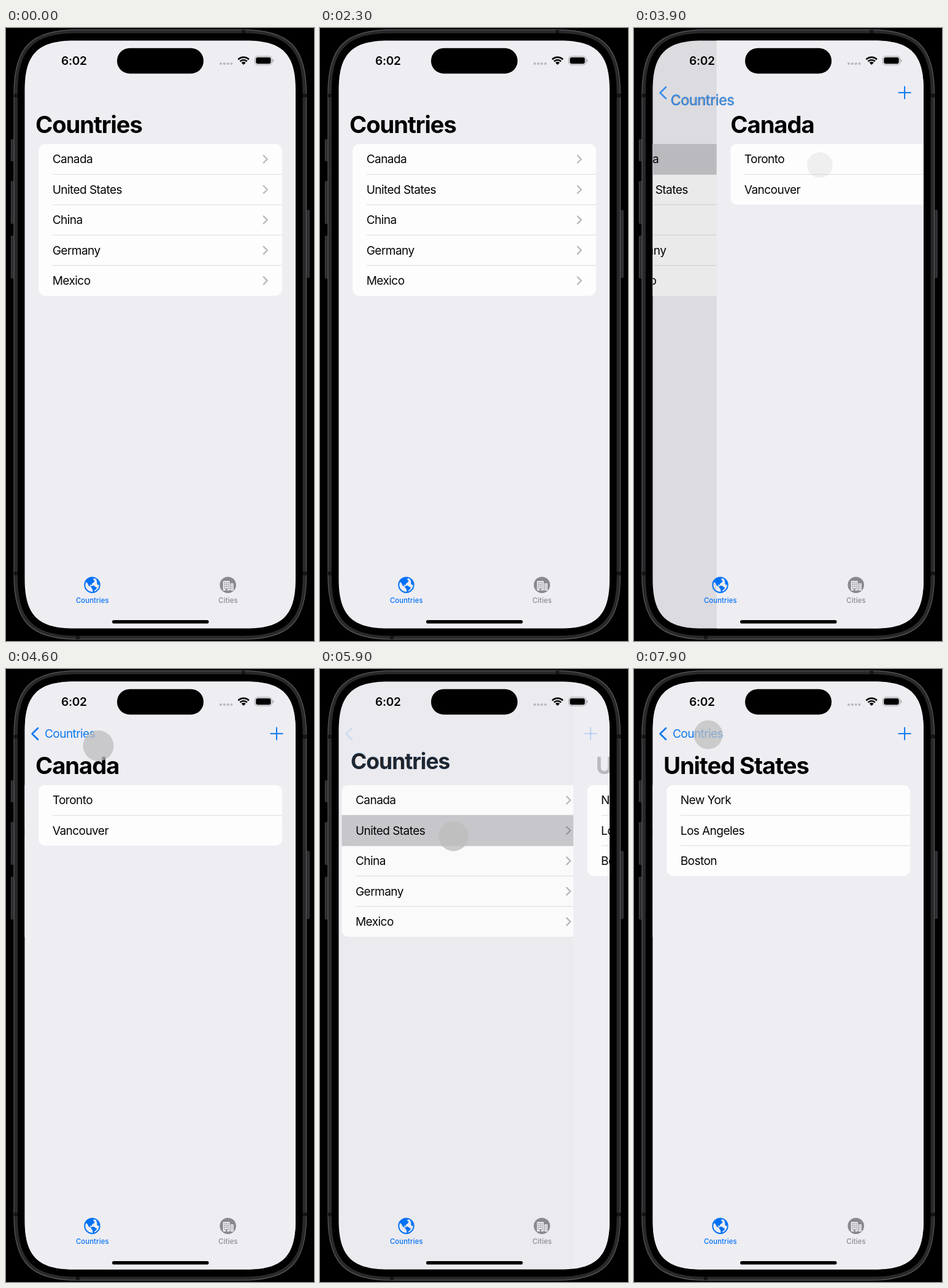
An HTML page with a canvas that plays this animation: 502 by 998 pixels, repeating every 8000 ms.

```html
<!DOCTYPE html>
<html lang="en">
<head>
<meta charset="utf-8">
<title>Countries</title>
<style>
  html, body { margin: 0; width: 100%; height: 100%; overflow: hidden; background: #000; }
  canvas { display: block; width: 502px; height: 998px; }
</style>
</head>
<body>
<canvas id="stage"></canvas>
<script>
const W = 502, H = 998, LOOP = 8000;
const canvas = document.getElementById('stage');
const ctx = canvas.getContext('2d');
const dpr = window.devicePixelRatio || 1;
canvas.width = W * dpr;
canvas.height = H * dpr;

const BG = '#eeedf2', CARD = '#fdfdfd', BLUE = '#0a78f0', TAB_BLUE = '#0071f5', GRAY = '#8a8a8e';
const FONT = 'Inter, Roboto, sans-serif';
const SCREEN = { x: 30.5, y: 20.5, w: 441.5, h: 957, r: 62 };
const ROW_TOP = 188.8, ROW_H = 49.45;

const countries = ['Canada', 'United States', 'China', 'Germany', 'Mexico'];
const cities = {
  'Canada': ['Toronto', 'Vancouver'],
  'United States': ['New York', 'Los Angeles', 'Boston']
};

const PUSH_1 = 3670, POP = 4830, PUSH_2 = 5848;
const touches = [
  { x: 303, y: 223, down: 3070, up: 3690 },
  { x: 150.5, y: 125, down: 4390, up: 4800 },
  { x: 217.5, y: 272, down: 5430, up: 5875 },
  { x: 121, y: 107, down: 7370, up: 7825 }
];

const clamp = v => Math.max(0, Math.min(1, v));
const mix = (a, b, p) => a + (b - a) * p;

// Critically damped spring, 0 to 1
function spring(ms) {
  if (ms <= 0) return 0;
  const s = ms * 0.012;
  return 1 - (1 + s) * Math.exp(-s);
}

function pushProgress(t) {
  if (t < POP) return spring(t - PUSH_1);
  if (t < PUSH_2) return 1 - spring(t - POP);
  return spring(t - PUSH_2);
}

function text(str, x, y, size, weight, color, spacing, align = 'left') {
  ctx.font = `${weight} ${size}px ${FONT}`;
  ctx.letterSpacing = spacing * size + 'px';
  ctx.textAlign = align;
  ctx.fillStyle = color;
  ctx.fillText(str, x, y);
}

const body = (str, x, y) => text(str, x, y, 19.1, 400, '#050505', -0.031);
const largeTitle = (str, x, y, size = 38.2) => text(str, x, y, size, 700, '#000', -0.028);

function box(x, y, w, h, r, color) {
  ctx.beginPath();
  ctx.roundRect(x, y, w, h, r);
  ctx.fillStyle = color;
  ctx.fill();
}

function disc(x, y, r, color) {
  ctx.beginPath();
  ctx.arc(x, y, r, 0, Math.PI * 2);
  ctx.fillStyle = color;
  ctx.fill();
}

function line(points, color, width, cap = 'round') {
  ctx.beginPath();
  points.forEach(([x, y]) => ctx.lineTo(x, y));
  ctx.strokeStyle = color;
  ctx.lineWidth = width;
  ctx.lineCap = cap;
  ctx.lineJoin = 'round';
  ctx.stroke();
}

function polygon(points, color) {
  ctx.beginPath();
  points.forEach(([x, y]) => ctx.lineTo(x, y));
  ctx.closePath();
  ctx.fillStyle = color;
  ctx.fill();
}

function withAlpha(alpha, draw) {
  ctx.save();
  ctx.globalAlpha = clamp(alpha);
  draw();
  ctx.restore();
}

// Rounded rectangle with continuous corners
function smoothRect(x, y, w, h, r) {
  const e = r * 1.3, c = r * 0.348, X = x + w, Y = y + h;
  ctx.beginPath();
  ctx.moveTo(x + e, y);
  ctx.lineTo(X - e, y);
  ctx.bezierCurveTo(X - c, y, X, y + c, X, y + e);
  ctx.lineTo(X, Y - e);
  ctx.bezierCurveTo(X, Y - c, X - c, Y, X - e, Y);
  ctx.lineTo(x + e, Y);
  ctx.bezierCurveTo(x + c, Y, x, Y - c, x, Y - e);
  ctx.lineTo(x, y + e);
  ctx.bezierCurveTo(x, y + c, x + c, y, x + e, y);
  ctx.closePath();
}

function drawCase() {
  ctx.fillStyle = '#000';
  ctx.fillRect(0, 0, W, H);

  const buttons = [[8, 181, 36], [8, 249, 70], [8, 338, 70], [489, 296, 111]];
  for (const [x, y, h] of buttons) {
    box(x, y, 5.5, h, 1.5, '#2b2b2d');
    ctx.fillStyle = '#47474a';
    ctx.fillRect(x < 100 ? x : x + 4.5, y + 1, 1, h - 2);
  }

  smoothRect(13, 2.8, 476.5, 992.4, 80);
  ctx.fillStyle = '#29292b';
  ctx.fill();
  ctx.strokeStyle = '#59595b';
  ctx.lineWidth = 1.2;
  ctx.stroke();

  ctx.fillStyle = '#151516';
  for (const y of [107, 885]) {
    ctx.fillRect(13, y, 7, 6);
    ctx.fillRect(483, y, 7, 6);
  }
  ctx.fillRect(384, 3, 6, 6);
  ctx.fillRect(114, 989, 6, 6);

  smoothRect(19, 8.5, 464.5, 981, 74);
  ctx.fillStyle = '#000';
  ctx.fill();
}

function drawStatusBar() {
  text('6:02', 90, 60, 19.1, 600, '#000', -0.015);
  box(181, 32.7, 141, 41.5, 20.7, '#000');

  for (let i = 0; i < 4; i++) disc(350 + i * 5.8, 58, 2.1, '#b9b9bd');

  const cx = 387.2, cy = 60, a = Math.PI / 4;
  ctx.lineCap = 'butt';
  ctx.strokeStyle = '#000';
  ctx.lineWidth = 2.7;
  for (const r of [12.3, 8]) {
    ctx.beginPath();
    ctx.arc(cx, cy, r, -Math.PI / 2 - a, -Math.PI / 2 + a);
    ctx.stroke();
  }
  ctx.beginPath();
  ctx.moveTo(cx, cy);
  ctx.arc(cx, cy, 5, -Math.PI / 2 - a, -Math.PI / 2 + a);
  ctx.fillStyle = '#000';
  ctx.fill();

  ctx.beginPath();
  ctx.roundRect(405.5, 46, 28, 14, 4.6);
  ctx.strokeStyle = '#a2a2a6';
  ctx.lineWidth = 1.1;
  ctx.stroke();
  box(407.3, 47.8, 24.4, 10.4, 3, '#000');
  box(434.8, 50.8, 1.5, 4.6, [0, 1.5, 1.5, 0], '#a2a2a6');
}

function drawGlobe(x, y) {
  ctx.save();
  ctx.translate(x, y);
  polygon([[-11, -5], [-7.5, -10], [-2, -12], [3, -11], [1.5, -8.5], [4, -7], [3, -4.5],
    [0, -2.5], [-1, 0.2], [-3.5, -0.6], [-3.2, 1.5], [-1, 2.6], [-2, 3.4], [-6, 0.8], [-8, -3.5]], TAB_BLUE);
  polygon([[-1, 1.5], [2.5, 1], [5, 3], [7.5, 4], [6.5, 7], [4, 8.5], [2.5, 12], [1, 11.5], [0.5, 7], [-1.7, 4.6]], TAB_BLUE);
  polygon([[6, -9], [10, -6], [11.8, -1], [9.5, 0.2], [7.6, -2.5], [8, -5]], TAB_BLUE);
  ctx.beginPath();
  ctx.arc(0, 0, 12.2, 0, Math.PI * 2);
  ctx.strokeStyle = TAB_BLUE;
  ctx.lineWidth = 2;
  ctx.stroke();
  ctx.restore();
}

function drawBuildings(x, y) {
  disc(x, y, 13.3, GRAY);
  box(x - 8, y - 6.5, 11, 15.5, 1, BG);
  box(x + 4, y - 2.5, 5.3, 11.5, 1, BG);
  ctx.fillStyle = GRAY;
  for (let row = 0; row < 4; row++) {
    for (let col = 0; col < 3; col++) {
      if (row < 3 || col !== 1) ctx.fillRect(x - 6.2 + col * 2.9, y - 4.3 + row * 3, 1.7, 1.7);
    }
    if (row < 3) {
      ctx.fillRect(x + 5.1, y - 0.7 + row * 3, 1.2, 1.5);
      ctx.fillRect(x + 7.2, y - 0.7 + row * 3, 1.2, 1.5);
    }
  }
  ctx.fillRect(x - 3.7, y + 5.4, 2.6, 3.6);
}

function drawTabBar() {
  drawGlobe(140.5, 906.7);
  drawBuildings(361.7, 906.7);
  text('Countries', 140.8, 936, 11.24, 500, TAB_BLUE, 0.014, 'center');
  text('Cities', 362, 936, 11.24, 500, GRAY, 0.014, 'center');
  box(173, 964, 157.5, 5.6, 2.8, '#000');
}

function drawList(items, dx, options = {}) {
  const { chevrons = false, selected = -1, glow = 0 } = options;
  const x = 53 + dx, w = 397, h = items.length * ROW_H;
  ctx.save();
  ctx.beginPath();
  ctx.roundRect(x, ROW_TOP, w, h, 11.3);
  ctx.clip();
  ctx.fillStyle = CARD;
  ctx.fillRect(x, ROW_TOP, w, h);

  for (let i = 1; i < items.length; i++) {
    ctx.fillStyle = '#dcdcde';
    ctx.fillRect(x + 23, ROW_TOP + i * ROW_H - 0.5, w - 23, 1);
  }
  if (selected >= 0) {
    withAlpha(glow, () => {
      ctx.fillStyle = '#c9c8cd';
      ctx.fillRect(x, ROW_TOP + selected * ROW_H - 0.5, w, ROW_H + 1);
    });
  }
  items.forEach((name, i) => {
    const mid = ROW_TOP + (i + 0.5) * ROW_H;
    body(name, x + 22.7, mid + 6.9);
    if (chevrons) {
      const c = i === selected && glow > 0.5 ? '#98979c' : '#b9b9bc';
      line([[x + 366.8, mid - 6], [x + 372.8, mid], [x + 366.8, mid + 6]], c, 2.3);
    }
  });
  ctx.restore();
}

function drawNavBar(p, country) {
  // The large title shrinks into the back button while cross-fading
  const x = mix(48, 63, p), y = mix(171, 112.2, p);
  withAlpha(1 - p, () => largeTitle('Countries', x, y, mix(38.2, 18, p)));
  if (p < 0.003) return;

  withAlpha(p, () => {
    text('Countries', x, y, mix(40.5, 19.1, p), 400, BLUE, -0.031);
    line([[52, 96.2], [42.5, 105.5], [52, 114.8]], BLUE, 2.7);
  });
  withAlpha(p * 1.6, () => {
    largeTitle(country, 48 + (1 - p) * SCREEN.w * 1.05, 171);
    line([[431.5, 105.2], [450.8, 105.2]], BLUE, 2);
    line([[441.1, 95.5], [441.1, 114.9]], BLUE, 2);
  });
}

function drawTouch({ x, y, down, up }, t) {
  if (t < down || t > up + 250) return;
  const grow = clamp((t - down) / 220);
  const fade = clamp((t - up) / 250);
  const r = 25 * mix(0.5, 1, 1 - (1 - grow) ** 2) * (1 - 0.2 * fade);
  withAlpha(0.79 * grow * (1 - fade * fade), () => disc(x, y, r, '#bebebe'));
}

function render(t) {
  const p = pushProgress(t);
  const first = t < 5400;
  const country = first ? 'Canada' : 'United States';
  const pressed = t >= (first ? 3600 : 5800);
  const glow = !pressed ? 0 : first && t > POP ? p : 1;

  ctx.setTransform(dpr, 0, 0, dpr, 0, 0);
  drawCase();
  ctx.save();
  smoothRect(SCREEN.x, SCREEN.y, SCREEN.w, SCREEN.h, SCREEN.r);
  ctx.fillStyle = BG;
  ctx.fill();
  ctx.clip();

  drawList(countries, -0.3 * SCREEN.w * p, { chevrons: true, selected: first ? 0 : 1, glow });
  if (p > 0) {
    const dx = (1 - p) * SCREEN.w;
    ctx.fillStyle = `rgba(0,0,0,${0.1 * p})`;
    ctx.fillRect(0, 0, W, H);
    ctx.fillStyle = BG;
    ctx.fillRect(SCREEN.x + dx, 0, W, H);
    drawList(cities[country], dx);
  }
  drawNavBar(p, country);
  drawTabBar();
  drawStatusBar();
  touches.forEach(touch => drawTouch(touch, t));
  ctx.restore();
}

const start = performance.now();
function tick() {
  render((performance.now() - start) % LOOP);
  requestAnimationFrame(tick);
}
tick();
</script>
</body>
</html>
```
